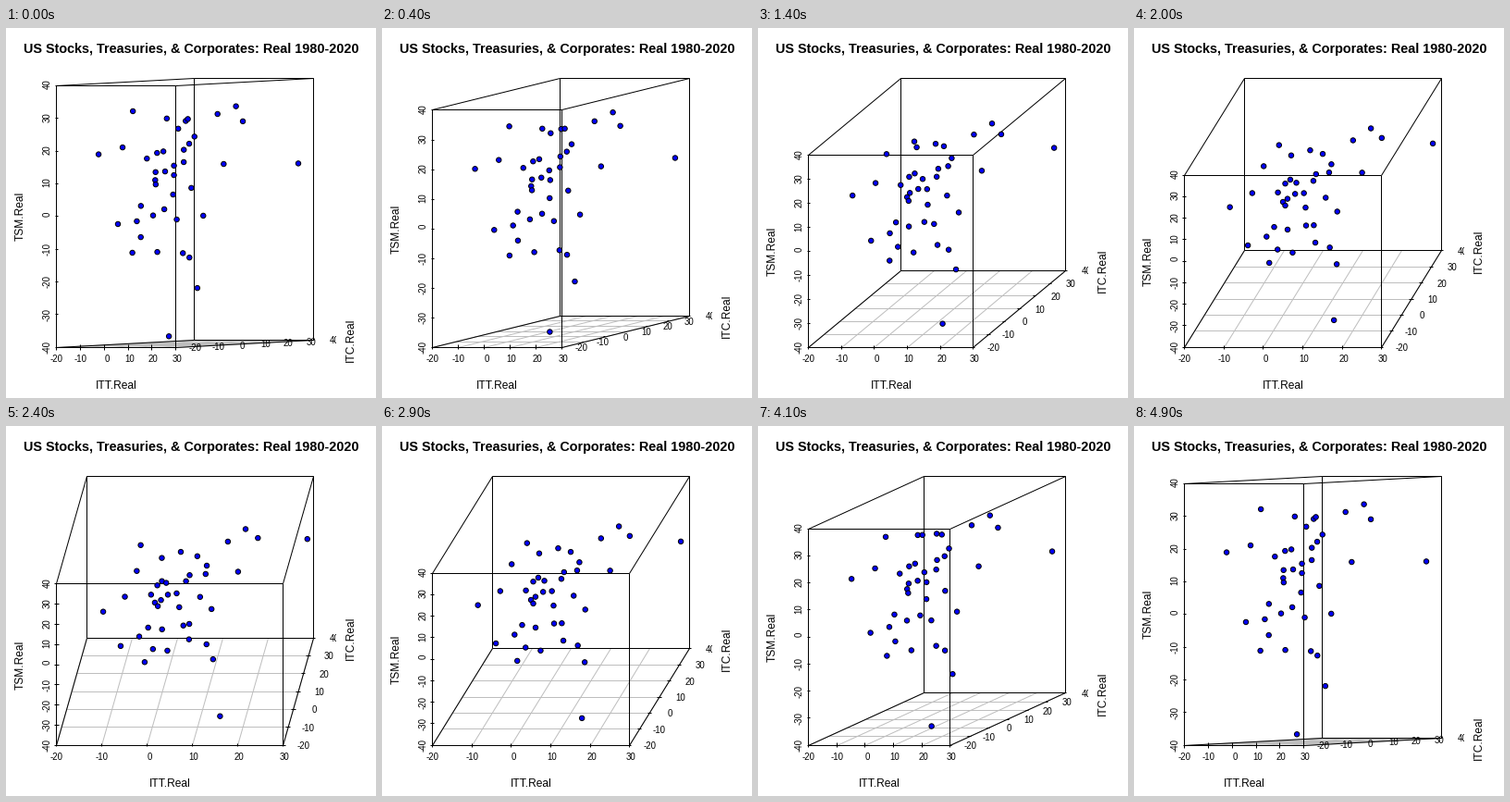
A matplotlib script that plays this animation: 400 px wide and 400 px high, repeating every 5000 ms.

```python
import itertools

import numpy as np
import matplotlib.pyplot as plt
from matplotlib.animation import FuncAnimation
from matplotlib.collections import LineCollection
from matplotlib.transforms import Bbox

plt.rcParams["font.family"] = "Liberation Sans"

SIZE, DPI = 400, 100
FRAMES, STEP_MS = 50, 100
PT = 72 / DPI                      # points per pixel
LEFT, RIGHT = 54.815, 332.43       # horizontal extent of the box
TOP, BOTTOM = 54.815, 345.185      # vertical extent of the box
CLIP_RIGHT = 356.8
NX, NY, NZ = 5, 6, 8               # axis lengths in tick steps
LOWS = np.array([-20, -20, -40])
TICK_SIZE, LABEL_SIZE, TITLE_SIZE = 9.6, 12, 14.4
SPACE = 0.278 * TICK_SIZE

# Yearly real returns: ITT, ITC, TSM
RETURNS = np.array([
    (-4.2, -3.2, 31.6), (0.2, 7.0, 29.0), (-5.7, 18.1, 25.5),
    (3.9, 11.4, 28.1), (7.9, 8.2, 28.8), (9.9, 9.0, 23.4),
    (9.9, 6.7, 21.3), (6.2, 8.2, 19.4), (5.3, 9.1, 15.6),
    (13.9, 14.9, 30.1), (17.3, 19.4, 32.3), (20.0, 19.6, 27.7),
    (16.1, 15.3, 14.8), (29.3, 34.1, 14.3), (-10.7, -11.4, 18.7),
    (-6.6, -5.2, 20.6), (-1.4, 0.0, 17.0), (-0.4, 3.4, 18.6),
    (0.4, 5.3, 19.0), (0.6, 1.7, 12.8), (1.8, 4.6, 12.9),
    (0.9, 9.4, 14.5), (3.5, 6.7, 11.7), (-0.9, 3.1, 10.3),
    (-0.2, 2.6, 9.0), (4.2, 5.6, 5.8), (8.4, 9.2, 7.7),
    (-1.8, -2.2, 2.6), (5.7, 0.2, 1.5), (1.0, 0.2, -0.4),
    (-3.8, -1.9, -2.1), (-7.4, -6.4, -2.8), (6.5, 4.8, -1.8),
    (10.6, 12.1, -0.9), (-0.6, -3.5, -6.9), (-2.2, -5.5, -11.6),
    (2.1, 0.9, -11.6), (6.1, 7.9, -12.2), (10.1, 6.6, -13.5),
    (11.3, 8.8, -22.9), (14.6, -7.0, -37.1),
])
POINTS = (RETURNS - LOWS) / 10


def box_edges():
    corners = list(itertools.product((0, NX), (0, NY), (0, NZ)))
    return [(p, q) for p, q in itertools.combinations(corners, 2)
            if sum(a != b for a, b in zip(p, q)) == 1]


def tick_segments():
    dx, dz = 0.01 * NX, 0.01 * NZ
    xs = [((i, 0, -dz), (i, 0, dz)) for i in range(NX + 1)]
    ys = [((NX - dx, j, 0), (NX + dx, j, 0)) for j in range(NY + 1)]
    zs = [((-dx, 0, k), (dx, 0, k)) for k in range(NZ + 1)]
    return xs + ys + zs


GRID = np.array([((i, 0, 0), (i, NY, 0)) for i in range(NX + 1)]
                + [((0, j, 0), (NX, j, 0)) for j in range(NY + 1)], float)
FRAME = np.array(box_edges() + tick_segments(), float)


def project(p, angle):
    """Oblique projection of tick-step coordinates to pixels."""
    p = np.asarray(p, float)
    rise = angle / 90
    run = 1 - rise
    ux = (RIGHT - LEFT) / (NX + NY * run)
    uz = (BOTTOM - TOP) / (NZ + NY * rise)
    x = LEFT + ux * (p[..., 0] + run * p[..., 1])
    y = BOTTOM - uz * (p[..., 2] + rise * p[..., 1])
    return np.stack([x, y], axis=-1)


def crisp(segments):
    return np.floor(segments) + 0.5


fig = plt.figure(figsize=(SIZE / DPI, SIZE / DPI), dpi=DPI, facecolor="white")
ax = fig.add_axes([0, 0, 1, 1])
ax.set(xlim=(0, SIZE), ylim=(SIZE, 0))
ax.axis("off")


def label(text, size, x=0, y=0, **kw):
    kw = {"ha": "center", "va": "baseline", "rotation_mode": "anchor", **kw}
    return ax.text(x, y, text, size=size * PT, color="black", **kw)


def tick_labels(low, count, **kw):
    return [label(str(low + 10 * i), TICK_SIZE, **kw) for i in range(count + 1)]


def padding(text):
    """Width of the blanks that right-align a label to three characters."""
    return SPACE * (3 - len(text.get_text()))


grid = LineCollection([], colors="#bebebe", linewidths=PT, snap=False, zorder=1)
frame = LineCollection([], colors="black", linewidths=PT, snap=False, zorder=2)
ax.add_collection(grid)
ax.add_collection(frame)
dots = ax.scatter(POINTS[:, 0], POINTS[:, 1], s=[(5.4 * PT) ** 2] * len(POINTS),
                  facecolor="#0000ff", edgecolor="black", linewidth=PT,
                  snap=False, zorder=4)

label("US Stocks, Treasuries, & Corporates: Real 1980-2020", TITLE_SIZE,
      200, 27, weight="bold")
x_name = label("ITT.Real", LABEL_SIZE, y=389.9)
y_name = label("ITC.Real", LABEL_SIZE, x=375.5, rotation=90)
z_name = label("TSM.Real", LABEL_SIZE, x=18.7, rotation=90)
x_ticks = tick_labels(-20, NX)
y_ticks = tick_labels(-20, NY, ha="left")
z_ticks = tick_labels(-40, NZ, rotation=90)
for t in y_ticks:
    t.set_clip_on(True)
    t.set_clip_box(Bbox([[0, 0], [CLIP_RIGHT, SIZE]]))


def update(i):
    angle = 3.2 * (min(i, FRAMES - 1 - i) + 1)
    grid.set_segments(crisp(project(GRID, angle)))
    frame.set_segments(crisp(project(FRAME, angle)))
    dots.set_offsets(project(POINTS, angle))

    for n, t in enumerate(x_ticks):
        x, _ = project((n, 0, 0), angle)
        t.set_position((x + padding(t) / 2, 361.1))
    for n, t in enumerate(y_ticks):
        x, y = project((NX, n, 0), angle)
        t.set_position((x + 14.4 + padding(t), y + 3.84))
    for n, t in enumerate(z_ticks):
        _, y = project((0, 0, n), angle)
        t.set_position((47.5, y - padding(t) / 2))

    x_name.set_x(project((NX / 2, 0, 0), angle)[0])
    y_name.set_y(project((NX, NY, 0), angle)[1])
    z_name.set_y(project((0, 0, NZ / 2), angle)[1])
    return []


anim = FuncAnimation(fig, update, frames=FRAMES, interval=STEP_MS,
                     repeat=True, repeat_delay=0, blit=False)
plt.show()
```
